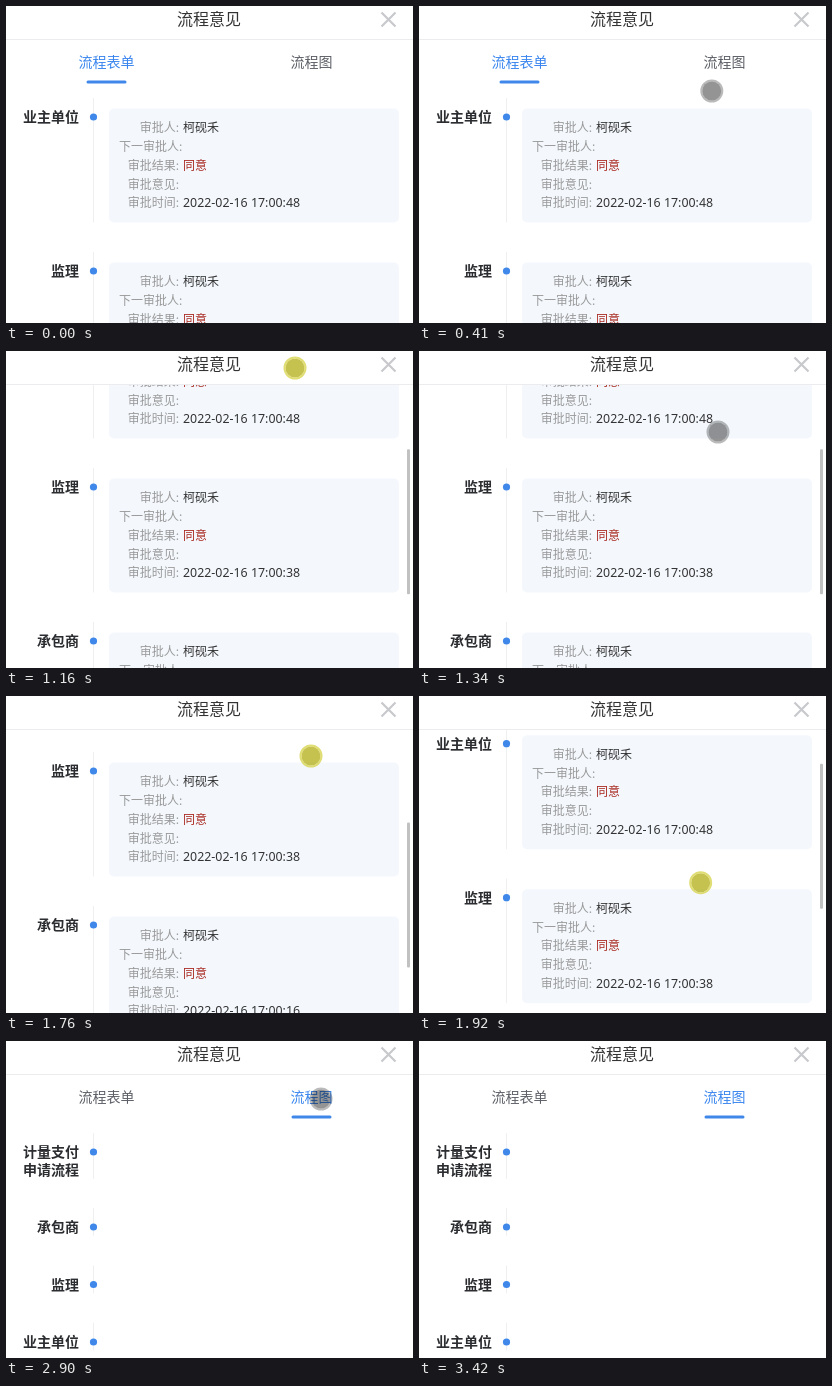
These frames come from a looping animation (407x317 px, 4090 ms). An HTML page:

```html
<!DOCTYPE html>
<html lang="zh-CN">
<head>
<meta charset="utf-8">
<title>流程意见</title>
<style>
  html, body { margin: 0; width: 100%; height: 100%; overflow: hidden; background: #fff; }
  svg { display: block; width: 407px; height: 317px; }
  text { font-family: "Noto Sans CJK SC", "Noto Sans", sans-serif; font-size: 12px; fill: #333; }
  .title { font-size: 16px; text-anchor: middle; }
  .tab { font-size: 14px; text-anchor: middle; fill: #5c5f66; }
  .tab.on { fill: #3a86ee; }
  .step { font-size: 14px; font-weight: 700; text-anchor: end; fill: #2b2d30; }
  .key { fill: #999; }
  .end { text-anchor: end; }
  .time { font-family: "Noto Sans", "Open Sans", sans-serif; font-size: 12.4px; }
  .ok { fill: #a8281f; }
  .card { fill: #f4f8fd; }
  .rail { fill: #eeeff1; }
  .dot, .bar { fill: #3f88ea; }
  .disc { fill: rgba(0, 0, 0, .42); }
  .ring { fill: none; stroke: rgba(0, 0, 0, .27); stroke-width: 2; }
  .down .disc { fill: rgba(178, 174, 20, .75); }
  .down .ring { stroke: rgba(214, 210, 70, .75); }
</style>
</head>
<body>
<svg viewBox="0 0 407 317">
  <defs><clipPath id="view"><rect y="34" width="407" height="283"/></clipPath></defs>
  <g clip-path="url(#view)">
    <g id="page">
      <text id="formTab" class="tab" x="100.5" y="61.3">流程表单</text>
      <text id="flowTab" class="tab" x="305.5" y="61.3">流程图</text>
      <rect id="bar" class="bar" y="74.5" width="40" height="3" rx="1.5"/>
      <g id="form"></g>
      <g id="flow"></g>
    </g>
    <rect id="thumb" x="401" width="3" height="145" rx="1" fill="#c1c1c1"/>
  </g>
  <rect y="33" width="407" height="1" fill="#ececee"/>
  <text class="title" x="203" y="19.1">流程意见</text>
  <path d="M375.5 6.5l14 14m0-14l-14 14" stroke="#c8c9cc" stroke-width="2.2" fill="none"/>
  <g id="cursor">
    <circle class="disc" r="9.5"/>
    <circle class="ring" r="10.5"/>
  </g>
</svg>
<script>
const LOOP = 4090, TICKS = 49;
const $ = id => document.getElementById(id);

// Key points of the pointer: tick, x, y.
const path = [
  [1, 348, 281], [6, 279, 36], [7, 279, 36], [10, 278, 129], [11, 279, 146],
  [14, 289, 17], [17, 304, 113], [19, 305, 60], [21, 305, 60], [24, 270, 250],
  [28, 311, 80], [30, 315, 58], [36, 315, 58], [39, 252, 235], [40, 339, 303]
];

// Scroll offset during the three drags: tick, offset.
const scroll = [[11, 0], [14, 129], [17, 129], [19, 190], [21, 190], [24, 0]];

const within = (n, from, to) => n >= from && n < to;
const pressed = n => within(n, 11, 15) || within(n, 17, 25) || within(n, 32, 34);

function track(keys, n, col) {
  const i = keys.findIndex(k => k[0] > n);
  if (i < 0) return keys.at(-1)[col];
  if (i === 0) return keys[0][col];
  const a = keys[i - 1], b = keys[i];
  return a[col] + (b[col] - a[col]) * (n - a[0]) / (b[0] - a[0]);
}

const text = (cls, x, y, s) => `<text class="${cls}" x="${x}" y="${y}">${s}</text>`;

function step(y, height, ...lines) {
  return `<rect class="rail" x="87" y="${y - 19}" width="1" height="${height}"/>` +
    `<circle class="dot" cx="87.5" cy="${y}" r="3.6"/>` +
    lines.map((s, i) => text("step", 73, y + 5.2 + i * 18, s)).join("");
}

function review(y, role, time) {
  const row = i => y + 15.4 + i * 18.7;
  const fields = [
    ["审批人:", "", "柯砚禾"],
    ["下一审批人:"],
    ["审批结果:", "ok", "同意"],
    ["审批意见:"],
    ["审批时间:", "time", "2022-02-16 " + time]
  ];
  return step(y, 124.5, role) +
    `<rect class="card" x="103" y="${y - 8.5}" width="290" height="114" rx="5"/>` +
    fields.map(([key, cls, value = ""], i) =>
      // The long key overflows its 60px column to the right.
      (key.length > 5 ? text("key", 113, row(i), key) : text("key end", 173, row(i), key)) +
      text(cls, 177, row(i), value)).join("");
}

$("form").innerHTML = review(111, "业主单位", "17:00:48") +
  review(265, "监理", "17:00:38") + review(419, "承包商", "17:00:16");
$("flow").innerHTML = step(111, 46, "计量支付", "申请流程") +
  ["承包商", "监理", "业主单位"].map((s, i) => step(186 + i * 57.5, 27.5, s)).join("");

const show = (id, on) => $(id).setAttribute("visibility", on ? "visible" : "hidden");

function draw(now) {
  // The picture advances in equal ticks.
  const n = Math.floor(now % LOOP / LOOP * TICKS + .35);
  const top = track(scroll, n, 1);
  const flow = n >= 33;
  const slide = Math.min(1, Math.max(0, (n - 32) / 3));

  $("page").setAttribute("transform", `translate(0 ${-top})`);
  $("thumb").setAttribute("y", 38.4 + top * .4634);
  show("thumb", within(n, 12, 30));
  show("form", !flow);
  show("flow", flow);
  $("formTab").classList.toggle("on", !flow);
  $("flowTab").classList.toggle("on", flow);
  $("bar").setAttribute("x", 80.5 + 205 * slide * slide * (3 - 2 * slide));

  $("cursor").setAttribute("transform", `translate(${track(path, n, 1)} ${track(path, n, 2)})`);
  $("cursor").classList.toggle("down", pressed(n));
  show("cursor", within(n, 1, 41));
  requestAnimationFrame(draw);
}
draw(0);
</script>
</body>
</html>
```
